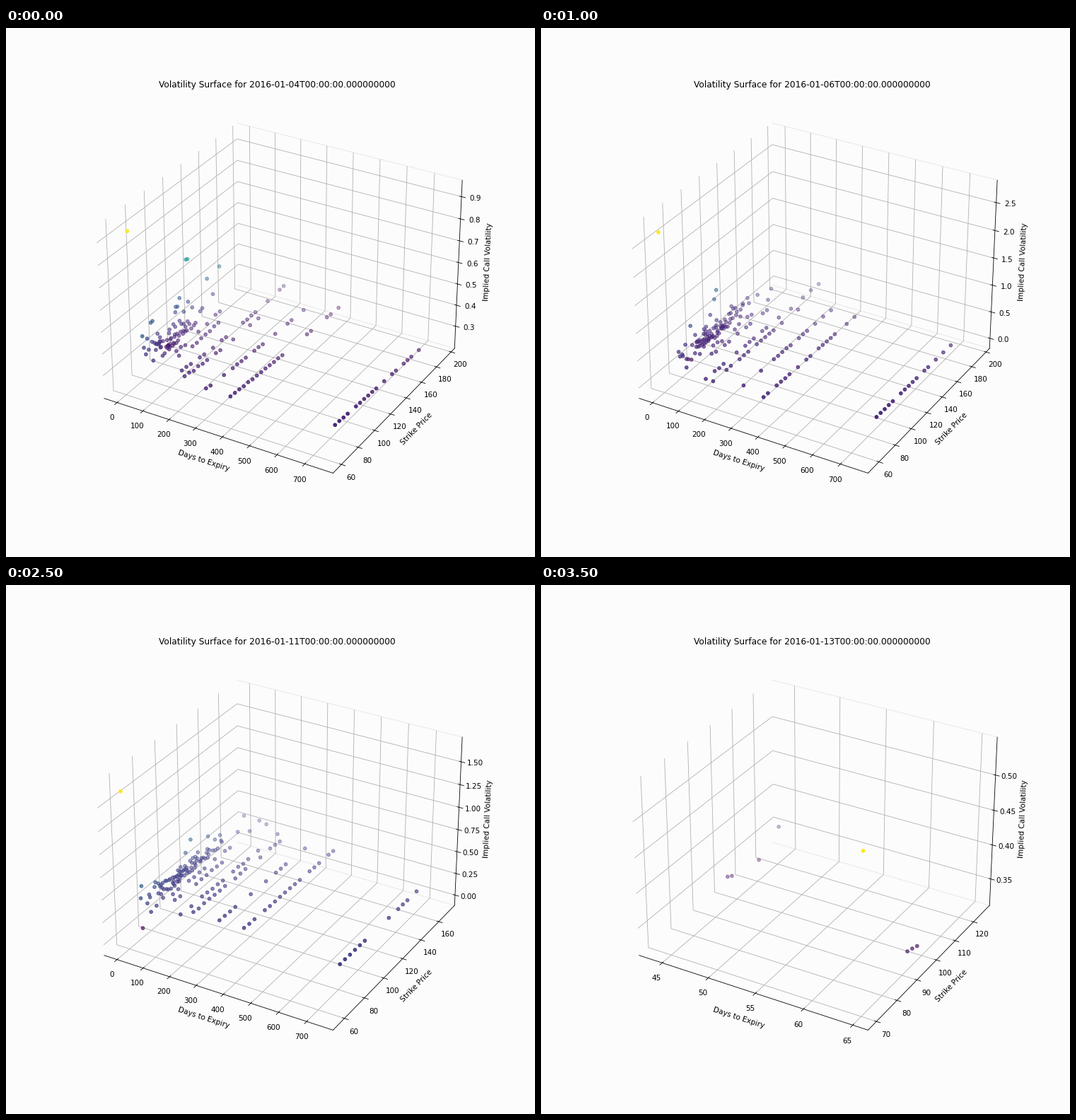
A matplotlib script for the animation above (4 s loop, 748 by 748 pixels).

```python
import numpy as np
import matplotlib.pyplot as plt
from matplotlib.animation import FuncAnimation
from matplotlib.lines import Line2D

SIZE = 748
SPOT = 100
START = 4                      # expiries are counted from this day of January
EXPIRIES = (4, 11, 18, 25, 32, 39, 46, 74, 102, 165, 193, 291, 382, 746)

# date, first expiry, strike range, vol range, vol tick,
# (expiry, strike) of the highest vol, strike of a stale quote
SESSIONS = [
    (4, 4, (60, 195), (0.243, 0.924), 0.1, (11, 65), None),
    (5, 4, (60, 195), (0.15, 1.2), 0.2, (4, 60), None),
    (6, 4, (57, 195), (0.005, 2.7), 0.5, (4, 60), 90),
    (7, 11, (42.5, 195), (0, 1.802), 0.25, (11, 50), 42.5),
    (8, 11, (34.3, 195), (0.281, 3.0), 0.5, (11, 34.3), None),
    (11, 11, (57, 170), (0, 1.646), 0.25, (11, 57), 71.5),
    (12, 11, (57, 170), (0.15, 1.2), 0.2, (11, 57), None),
]

# The last session has only a few quotes: days, strike, vol
LAST_DATE = 13
LAST_QUOTES = np.array([
    (44, 100, 0.340), (44, 102, 0.336), (44, 115, 0.326), (44, 125, 0.351),
    (65, 70, 0.5373), (65, 92.5, 0.338), (65, 95, 0.335), (65, 97.5, 0.3315),
])

plt.rcParams.update({"figure.facecolor": "#fcfcfc", "axes.facecolor": "none"})
fig = plt.figure(figsize=(10, 10), dpi=SIZE / 10)
ax = fig.add_subplot(projection="3d")

# Faint rims of the back wall
for (x0, y0), (x1, y1) in [((327, 134.5), (645, 215)), ((328, 364), (634, 453))]:
    fig.add_artist(Line2D([x0 / SIZE, x1 / SIZE], [1 - y0 / SIZE, 1 - y1 / SIZE],
                          color="#e9e9e9", lw=1, zorder=-1))


def smile(strike, days, peak_days, peak_strike, peak):
    """Flat skew plus wings that fade with time to expiry."""
    gap = np.abs(strike - SPOT) / (SPOT - peak_strike)
    fade = min(1, peak_days / days) ** 1.5
    side = np.where(strike > SPOT, 0.7, 1)
    base = 0.3 - 0.0004 * (strike - SPOT)
    return base + (peak - 0.3) * side * fade * gap ** 1.5


def listed(expiry, days, low, high, rng):
    """Strikes with a quote: dense near the spot, wider for later expiries."""
    if expiry == EXPIRIES[-1]:
        low, high = 70, high - 20
    step = 2.5 if days < 45 else 5
    grid = np.arange(np.ceil(low / 5) * 5, high + 0.1, step)
    width = 12 * days ** 0.28
    odds = 0.75 * np.exp(-((grid - 1.08 * SPOT) / width) ** 2)
    return grid[rng.random(len(grid)) < odds]


def market(date, first, strikes, vols, peak_at, stale):
    """All quotes of one session as rows of days, strike, vol."""
    rng = np.random.default_rng(date)
    gone = date - START
    peak_days, deep = peak_at[0] - gone, peak_at[1]
    rows = [(peak_days, deep, vols[1])]
    if stale:
        rows.append((first - gone, stale, vols[0]))
    for expiry in EXPIRIES:
        if expiry < first:
            continue
        days = expiry - gone
        low = deep + 5 if expiry <= peak_at[0] else max(deep, 60)
        ks = listed(expiry, days, low, strikes[1], rng)
        spread = 0.012 * (vols[1] - vols[0]) * min(1, 40 / days)
        vs = smile(ks, days, peak_days, deep, vols[1])
        vs = np.clip(vs + rng.normal(0, spread, len(ks)), *vols)
        rows += [(days, k, v) for k, v in zip(ks, vs)]
    return np.array(rows)


def widen(lo, hi, share):
    mid, half = (lo + hi) / 2, (hi - lo) * share
    return mid - half, mid + half


def ticks(lo, hi, step):
    a, b = widen(lo, hi, 0.55)
    return np.arange(np.ceil(a / step), np.floor(b / step) + 1) * step


def show(date, quotes, ranges, steps):
    days, strike, vol = quotes.T
    ax.clear()
    ax.scatter(days, strike, vol, c=vol, vmin=ranges[2][0], vmax=ranges[2][1])
    setters = (ax.set_xlim, ax.set_ylim, ax.set_zlim)
    axes = (ax.xaxis, ax.yaxis, ax.zaxis)
    for axis, set_lim, span, step in zip(axes, setters, ranges, steps):
        axis.set_pane_color((1, 1, 1, 0))
        axis.set_ticks(ticks(*span, step))
        set_lim(*widen(*span, 0.55 * 25 / 24))
    ax.set_xlabel("Days to Expiry")
    ax.set_ylabel("Strike Price")
    ax.set_zlabel("Implied Call Volatility")
    ax.set_title(f"Volatility Surface for 2016-01-{date:02d}T00:00:00.000000000",
                 fontsize=11.85)


def draw(i):
    if i == len(SESSIONS):
        ranges = list(zip(LAST_QUOTES.min(axis=0), LAST_QUOTES.max(axis=0)))
        show(LAST_DATE, LAST_QUOTES, ranges, (5, 10, 0.05))
        return ()
    date, first, strikes, vols, step, peak_at, stale = SESSIONS[i]
    gone = date - START
    ranges = [(first - gone, EXPIRIES[-1] - gone), strikes, vols]
    quotes = market(date, first, strikes, vols, peak_at, stale)
    show(date, quotes, ranges, (100, 20, step))
    return ()


anim = FuncAnimation(fig, draw, frames=len(SESSIONS) + 1, interval=500, repeat=True)
plt.show()
```
